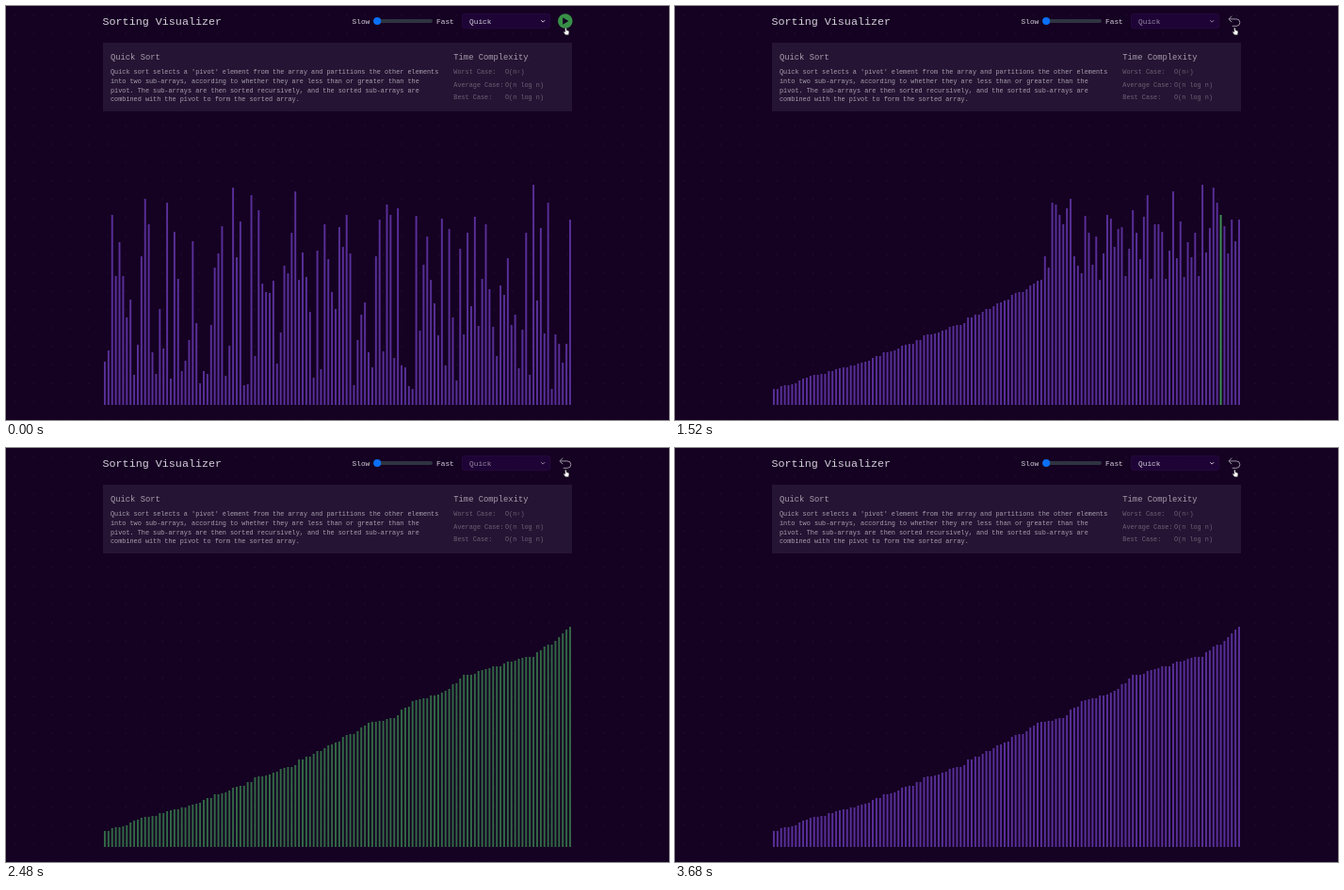
An HTML page that plays this animation: 704x440 px, repeating every 3760 ms.

```html
<!DOCTYPE html>
<html lang="en">
<head>
<meta charset="utf-8">
<title>Sorting Visualizer</title>
<style>
  html, body { margin: 0; width: 100%; height: 100%; overflow: hidden; background: #150122; }
  svg { display: block; width: 704px; height: 440px; font-family: "Liberation Mono", monospace; }
  .title { font-size: 11.73px; fill: #d6d0dc; }
  .label { font-size: 7.82px; fill: #d6d0dc; }
  .heading { font-size: 8.8px; fill: #a79eae; }
  .body { font-size: 6.84px; fill: #a79eae; }
  .dim { font-size: 6.84px; fill: #6c6175; }
</style>
</head>
<body>
<svg viewBox="0 0 704 440">
  <defs>
    <pattern id="dots" width="19.556" height="19.556" patternUnits="userSpaceOnUse">
      <circle cx="9.778" cy="9.778" r=".5" fill="#fff" opacity=".14"/>
    </pattern>
  </defs>
  <rect width="704" height="440" fill="#150122"/>
  <rect width="704" height="440" fill="url(#dots)"/>

  <text class="title" x="102.5" y="19.8">Sorting Visualizer</text>
  <text class="label" x="367.5" y="18.6">Slow</text>
  <rect x="390" y="14" width="63" height="4" rx="2" fill="#2e3441"/>
  <circle cx="394.2" cy="16" r="4" fill="#0a6ff8"/>
  <text class="label" x="457" y="18.6">Fast</text>

  <rect x="484.5" y="8.3" width="93.3" height="15.5" rx="2.5" fill="#1e0436" stroke="#2c1046" stroke-width=".6"/>
  <g id="select">
    <text class="label" x="492" y="18.6">Quick</text>
    <path d="M568.3 15.2l1.9 1.9 1.9-1.9" fill="none" stroke="#d6d0dc" stroke-width="1"/>
  </g>

  <g id="play">
    <circle cx="593.8" cy="16" r="7.8" fill="#389148"/>
    <path d="M591.2 12.2v7.6l6.2-3.8z" fill="#150122"/>
  </g>
  <path id="reset" d="M591.2 10.6l-3.2 3.3 3.2 3.3M588.2 13.9h7.9a3.7 3.7 0 0 1 0 7.4h-4.4"
        fill="none" stroke="#9a91a3" stroke-width="1"/>

  <rect x="103" y="39" width="498" height="73" fill="#251433"/>
  <text class="heading" x="111" y="57">Quick Sort</text>
  <text class="body" x="111" y="72">Quick sort selects a 'pivot' element from the array and partitions the other elements</text>
  <text class="body" x="111" y="81.7">into two sub-arrays, according to whether they are less than or greater than the</text>
  <text class="body" x="111" y="91.5">pivot. The sub-arrays are then sorted recursively, and the sorted sub-arrays are</text>
  <text class="body" x="111" y="101.3">combined with the pivot to form the sorted array.</text>
  <text class="heading" x="475.3" y="57">Time Complexity</text>
  <text class="dim" x="475.3" y="72">Worst Case:</text>
  <text class="dim" x="530" y="72">O(n²)</text>
  <text class="dim" x="475.3" y="85.6">Average Case:</text>
  <text class="dim" x="530" y="85.6">O(n log n)</text>
  <text class="dim" x="475.3" y="99.2">Best Case:</text>
  <text class="dim" x="530" y="99.2">O(n log n)</text>

  <g id="bars"></g>

  <path d="M593.6 23.2q.8-.6 1.3.3l.5 2.4 1.6.4q1 .3.9 1.4l-.5 3h-3.3l-2.1-2.8q-.2-1 1.1-.6l.7.5z"
        fill="#fff" stroke="#111" stroke-width=".4"/>
</svg>
<script>
const LOOP = 3760, CLICK = 80, SORT_START = 200, SORT_END = 2210, PULSE = 1000;
const PURPLE = '#582f98', GREEN = '#3d9154';
const FLOOR = 424, LEFT = 103.98, PITCH = 3.89, WIDTH = 1.95;

// y of each bar's top before sorting
const tops = [
  378, 366, 222, 287, 251, 287, 331, 312, 392, 360, 266, 205, 232, 368, 391, 322,
  364, 209, 396, 240, 290, 388, 377, 355, 250, 337, 401, 388, 391, 339, 278, 263,
  234, 393, 361, 193, 267, 229, 403, 402, 201, 372, 217, 295, 304, 305, 292, 380,
  347, 276, 284, 241, 197, 291, 262, 288, 325, 395, 260, 386, 232, 269, 304, 322,
  235, 256, 222, 263, 403, 355, 328, 315, 368, 384, 266, 227, 367, 211, 222, 374,
  215, 382, 384, 404, 407, 223, 345, 275, 245, 291, 316, 350, 226, 382, 237, 331,
  398, 258, 349, 241, 319, 224, 340, 290, 232, 301, 341, 372, 297, 307, 268, 339,
  328, 385, 344, 241, 392, 190, 313, 236, 348, 209, 407, 349, 359, 379, 359, 227
];
const heights = tops.map(top => FLOOR - top);

// Records the sort as steps: { look: index } or { put: index, height }
function recordQuickSort(source) {
  const list = source.slice(), steps = [];

  function swap(a, b) {
    steps.push({ put: a, height: list[b] }, { put: b, height: list[a] });
    [list[a], list[b]] = [list[b], list[a]];
  }

  function partition(begin, end) {
    const pivot = list[begin];
    let i = begin, j = end + 1;
    while (true) {
      while (list[++i] <= pivot && i < end) steps.push({ look: i });
      while (list[--j] >= pivot && j > begin) steps.push({ look: j });
      if (j <= i) break;
      swap(i, j);
    }
    swap(begin, j);
    return j;
  }

  function sort(begin, end) {
    if (begin >= end) return;
    const middle = partition(begin, end);
    sort(begin, middle - 1);
    sort(middle + 1, end);
  }

  sort(0, list.length - 1);
  return steps;
}

const steps = recordQuickSort(heights);
const byId = id => document.getElementById(id);
const group = byId('bars');
const bars = heights.map((_, i) => {
  const bar = document.createElementNS('http://www.w3.org/2000/svg', 'rect');
  bar.setAttribute('x', LEFT + i * PITCH);
  bar.setAttribute('width', WIDTH);
  return group.appendChild(bar);
});

function pulseOpacity(phase) {
  const dip = 1 - Math.abs(2 * phase - 1);
  return 1 - 0.5 * dip * dip * (3 - 2 * dip);
}

function draw(time) {
  const progress = Math.min(1, Math.max(0, (time - SORT_START) / (SORT_END - SORT_START)));
  const done = Math.floor(progress * steps.length);
  const current = heights.slice();
  for (const step of steps.slice(0, done)) {
    if ('put' in step) current[step.put] = step.height;
  }
  const looked = done > 0 && done < steps.length ? steps[done - 1].look : -1;
  const pulsing = time >= SORT_END && time < SORT_END + PULSE;

  bars.forEach((bar, i) => {
    bar.setAttribute('y', FLOOR - current[i]);
    bar.setAttribute('height', current[i]);
    bar.setAttribute('fill', pulsing || i === looked ? GREEN : PURPLE);
  });
  group.setAttribute('opacity', pulsing ? pulseOpacity((time - SORT_END) / PULSE) : 1);

  const clicked = time >= CLICK;
  byId('play').setAttribute('visibility', clicked ? 'hidden' : 'visible');
  byId('reset').setAttribute('visibility', clicked ? 'visible' : 'hidden');
  byId('select').setAttribute('opacity', clicked && time < SORT_END + PULSE ? 0.65 : 1);
}

const origin = performance.now();
function tick() {
  draw((performance.now() - origin) % LOOP);
  requestAnimationFrame(tick);
}
tick();
</script>
</body>
</html>
```
